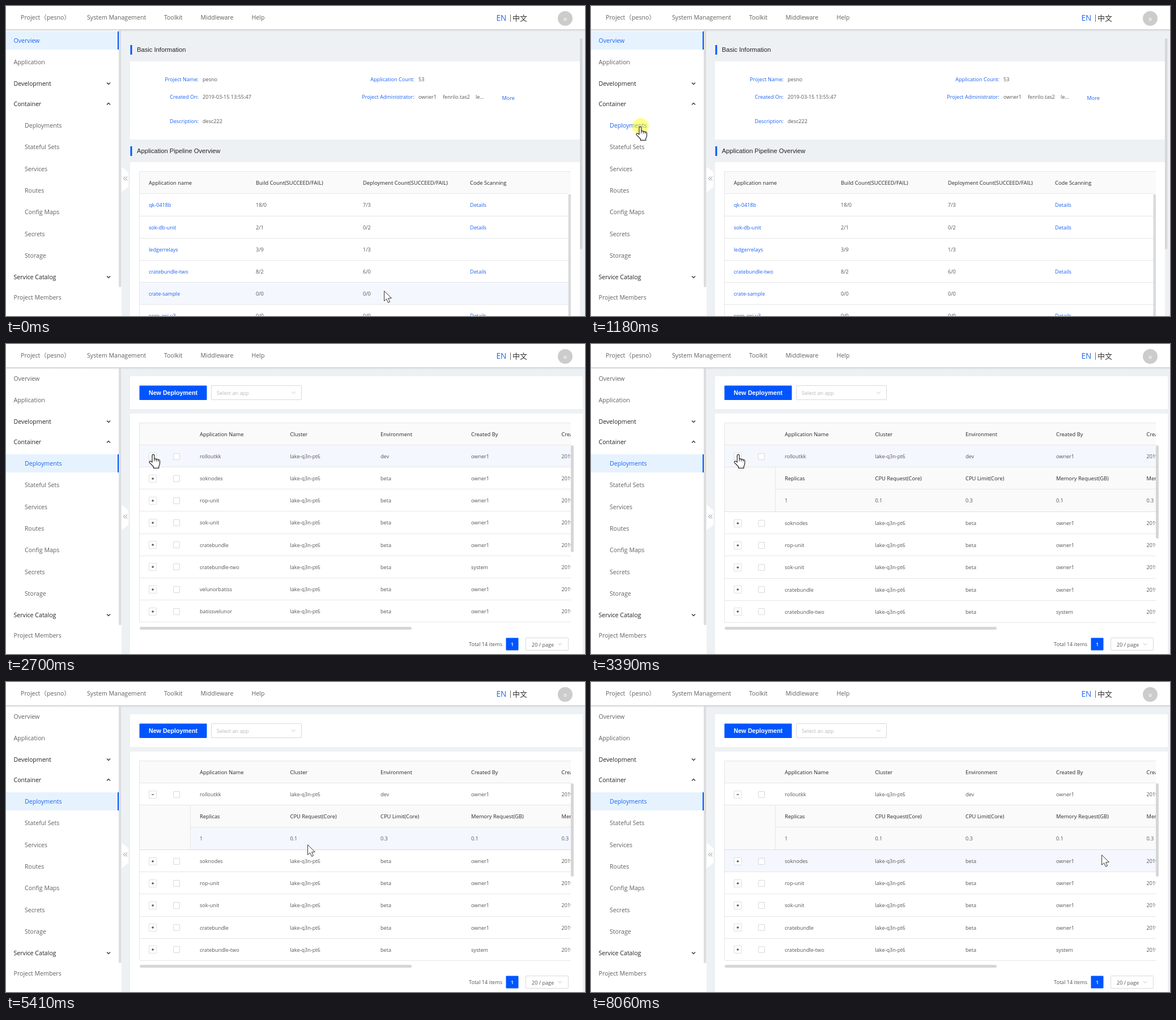
Write an HTML page that moves like this. It is 1022 px wide and 548 px high and loops after 8210 ms.

```html
<!DOCTYPE html>
<html lang="en">
<head>
<meta charset="utf-8">
<title>Deployments walkthrough</title>
<style>
html, body { margin: 0; width: 100%; height: 100%; overflow: hidden; background: #eef1f4; }
svg { display: block; }
text { font-family: "Open Sans", "Noto Sans", "Noto Sans CJK SC", "Noto Sans CJK", sans-serif; font-size: 9.1px; fill: #555; white-space: pre; }
.nav { font-size: 10.6px; fill: #606060; }
.group { font-size: 10.6px; fill: #222; }
.head { font-size: 9.35px; font-weight: 500; fill: #262626; }
.link { fill: #1a62f2; }
.title { font-family: "Liberation Sans", Arial, sans-serif; font-size: 11.2px; fill: #222; }
.button { font-family: "Liberation Sans", Arial, sans-serif; font-size: 10.7px; font-weight: bold; fill: #fff; }
.hint { fill: #b8b8b8; }
.end { text-anchor: end; }
.mid { text-anchor: middle; }
</style>
</head>
<body>
<svg id="stage" width="1022" height="548" viewBox="0 0 1022 548"></svg>
<script>
const LOOP = 8210;
const BLUE = '#0055ff', LINE = '#e6e6e6', BAR = '#d6d6d6', HOVER = '#f4f7fe';
const ROW = 39.15, DETAIL = 79;

const rect = (x, y, w, h, fill, extra = '') =>
  `<rect x="${x}" y="${y}" width="${w}" height="${h}" fill="${fill}" ${extra}/>`;
const frame = (x, y, w, h, r = 1.5, stroke = '#d9d9d9') =>
  rect(x, y, w, h, '#fff', `rx="${r}" stroke="${stroke}"`);
const text = (x, y, s, cls = '', extra = '') =>
  `<text x="${x}" y="${y}" class="${cls}" ${extra}>${s}</text>`;
const path = (d, stroke, w = 1, fill = 'none') =>
  `<path d="${d}" fill="${fill}" stroke="${stroke}" stroke-width="${w}"/>`;
const chevron = (x, y, dir, size, stroke, w) =>
  path(`M${x - size} ${y - dir * size / 2}l${size} ${dir * size}l${size} ${-dir * size}`, stroke, w);
const group = (id, body, extra = '') => `<g id="${id}" ${extra}>${body}</g>`;
const cells = (xs, y, list, cls = '') =>
  list.map((s, i) => s ? text(xs[i], y + 3.4, s, cls) : '').join('');

function header() {
  return rect(0, 0, 1022, 41, '#fff') + rect(0, 41, 1022, 4, 'url(#shade)') +
    text(26, 24, 'Project', 'nav') + text(61, 24, '（', 'nav') +
    text(72, 24, 'pesno', 'nav') + text(102.5, 24, '）', 'nav') +
    text(143, 24, 'System Management', 'nav') + text(279, 24, 'Toolkit', 'nav') +
    text(343.5, 24, 'Middleware', 'nav') + text(433.5, 24, 'Help', 'nav') +
    text(865.5, 25.5, 'EN', 'link', 'style="font-size:13.6px"') +
    text(887, 25, '|', '', 'style="font-size:12.5px"') +
    text(894, 25.5, '中文', '', 'style="font-size:13px;fill:#333"') +
    '<circle cx="987" cy="22" r="13" fill="#ccc"/>' +
    text(987, 25.5, 'o', 'mid', 'style="fill:#fff;font-weight:600"');
}

function sidebar() {
  const groups = [['Development', 137, 1], ['Container', 173, -1], ['Service Catalog', 479, 1]];
  const subs = ['Stateful Sets', 'Services', 'Routes', 'Config Maps', 'Secrets', 'Storage'];
  const selected = y => rect(0, y, 198, 32, '#e6f3ff') + rect(197, y, 2, 32, BLUE);
  return rect(0, 41, 204, 507, '#fff') + rect(199, 42, 4.5, 455, '#dcdddf', 'rx="2"') +
    group('pickOverview', selected(45)) + group('pickDeploy', selected(195)) +
    text(13.5, 65, 'Overview', 'nav', 'id="overviewItem"') +
    text(13.5, 103, 'Application', 'nav') + text(13.5, 518.7, 'Project Members', 'nav') +
    groups.map(([s, y, dir]) => text(13.5, y + 4.2, s, 'group') + chevron(181, y, dir, 3, '#333', 1.3)).join('') +
    text(33, 215, 'Deployments', 'nav', 'id="deployItem"') +
    subs.map((s, i) => text(33, 253.3 + i * 38.35, s, 'nav')).join('') +
    path('M204 284L216 294V320L204 329Z', 'none', 0, '#fff') +
    path('M210.5 301.5l-3 3.5l3 3.5M214 301.5l-3 3.5l3 3.5', '#8c8c8c');
}

function overview() {
  const xs = [252, 441, 630, 819], top = 331.9;
  const rows = [
    ['qk-0418b', '18/0', '7/3', 'Details'], ['sok-db-unit', '2/1', '0/2', 'Details'],
    ['ledgerrelays', '3/9', '1/3', ''], ['cratebundle-two', '8/2', '6/0', 'Details'],
    ['crate-sample', '0/0', '0/0', ''], ['sorn-api-v3', '0/0', '0/0', 'Details']
  ];
  const info = [
    [340, 130, 'Project Name:', 'pesno'], [340, 161, 'Created On:', '2019-03-15 13:55:47'],
    [340, 204, 'Description:', 'desc222'], [721, 130, 'Application Count:', '53'],
    [721, 161, 'Project Administrator:', 'owner1']
  ];
  const title = (y, s) => rect(219.5, y - 8, 3, 17, BLUE) + text(231, y + 4, s, 'title');
  return title(77, 'Basic Information') + title(256, 'Application Pipeline Overview') +
    rect(219, 98, 794, 138, '#fff') + rect(219, 276, 794, 272, '#fff') +
    rect(1013, 57, 4.5, 373, '#d6d7d9', 'rx="2"') +
    info.map(([x, y, k, v]) => text(x, y + 3.4, k, 'link end') + text(x + 7, y + 3.4, v)).join('') +
    text(771, 164.4, 'fenrilo.tas2') + text(829, 164.4, 'le...') + text(875.5, 166, 'More', 'link') +
    rect(236, 292.5, 761, 39, '#fafafa') + group('hoverOverview', rect(236, 0, 756.5, ROW, HOVER)) +
    cells(xs, 313, ['Application name', 'Build Count(SUCCEED/FAIL)', 'Deployment Count(SUCCEED/FAIL)', 'Code Scanning'], 'head') +
    path('M997 292.5H235.5V548', LINE) +
    rows.map((r, i) => {
      const y = top + i * ROW;
      return path(`M236 ${Math.floor(y) + .5}H992.5`, LINE) +
        r.map((s, k) => text(xs[k], y + 23.5, s, k % 3 ? '' : 'link')).join('');
    }).join('') +
    rect(992.5, 332.5, 4.5, 220, '#d9dadc', 'rx="2"');
}

const COLS = [342, 501.5, 661, 821, 980.5];

function deployRow(name, i) {
  const y = 179 + i * ROW, mid = Math.round(y + 19.6);
  return path(`M236 ${Math.round(y + ROW) - .5}H998`, LINE) +
    frame(252.5, mid - 6.5, 13, 13, .5, '#e0e0e0') +
    path(`M257 ${mid}H261.2`, '#444', 1.2) +
    group('stem' + i, path(`M259.1 ${mid - 2.1}v4.2`, '#444', 1.2)) +
    frame(295.5, mid - 5.5, 11, 11) +
    cells(COLS, y + 19.6, [name, 'lake-q3n-pt6', i ? 'beta' : 'dev', name === 'cratebundle-two' ? 'system' : 'owner1', '2019-07-25']);
}

function nested() {
  return rect(236, 218, 762, 78.5, '#fafafa') +
    group('hoverNested', rect(326, 257, 672, 39, HOVER)) +
    path('M326 256.5H998M325.5 218V296', LINE) + path('M236 296.5H998', '#dedede') +
    cells(COLS, 238, ['Replicas', 'CPU Request(Core)', 'CPU Limit(Core)', 'Memory Request(GB)', 'Memory Limit(GB)'], 'head') +
    cells(COLS, 277, ['1', '0.1', '0.3', '0.1', '0.3']);
}

function deployments() {
  const names = ['rolloutkk', 'soknodes', 'rop-unit', 'sok-unit', 'cratebundle', 'cratebundle-two', 'velunorbatiss', 'batissvelunor'];
  const rows = names.map(deployRow);
  return rect(219, 57, 799, 58, '#fff') + rect(219, 123, 799, 425, '#fff') +
    rect(235.5, 73.5, 119, 25.5, BLUE, 'rx="1"') + text(295, 90, 'New Deployment', 'button mid') +
    frame(362.5, 73.5, 159, 25) + text(372, 90, 'Select an app', 'hint') + chevron(507.5, 86, 1, 3.5, '#c4c4c4', 1) +
    `<g clip-path="url(#tableClip)">` +
    rect(236, 139.5, 762, 39, '#fafafa') +
    group('hoverRow', rect(236, 0, 762, ROW, HOVER)) +
    path('M998 139.5H235.5V492M236 178.5H998', LINE) +
    cells(COLS, 159.5, ['Application Name', 'Cluster', 'Environment', 'Created By', 'Created On'], 'head') +
    rows[0] + group('detail', nested()) + group('restRows', rows.slice(1).join('')) + '</g>' +
    rect(997, 179, 5, 189, BAR, 'id="scroll" rx="2.5"') + rect(236, 500, 480, 5, BAR, 'rx="2.5"') +
    text(817, 534, 'Total 14 items') + rect(882.5, 519.5, 22, 22, BLUE, 'rx="1"') +
    text(893.5, 534.2, '1', 'mid', 'style="fill:#fff;font-weight:600"') +
    frame(917.5, 519.5, 75, 22) + text(928, 535, '20 / page') + chevron(978, 530.5, 1, 3.3, '#c4c4c4', 1);
}

const arrow = path('M.6 .8V18.4L4.6 14.8L7.6 21.4L10.5 20L7.7 13.8L13.3 13.4Z', '#333', 1, '#fff');
const hand = path('M-2 14V2.3a1.9 1.9 0 0 1 3.8 0V8.8c.5-1.4 3.3-1.2 3.5.5 .6-1.2 3.1-1 3.3.8 .8-.9 2.9-.4 2.9 1.3V16c0 3-1.8 4.4-1.8 6V24.4H.4V22L-6.6 14.8c-1.3-1.9 .9-3.6 2.5-2.2Z', '#222', 1.2, '#fff') +
  path('M1.8 8.8V12.4M5.3 9.4V12.6M8.6 10.2V12.8', '#222');

document.getElementById('stage').innerHTML =
  '<defs><clipPath id="tableClip"><rect x="235" y="139" width="762" height="354"/></clipPath>' +
  '<linearGradient id="shade" x2="0" y2="1"><stop stop-color="#ccd0d4"/>' +
  '<stop offset="1" stop-color="#ccd0d4" stop-opacity="0"/></linearGradient></defs>' +
  rect(0, 0, 1022, 548, '#eef1f4') + group('overviewPage', overview()) + group('deployPage', deployments()) +
  sidebar() + header() +
  '<circle id="ring" r="14.5" fill="#ff0" fill-opacity=".47"/>' +
  group('arrow', arrow) + group('hand', hand);

const el = {};
document.querySelectorAll('[id]').forEach(e => el[e.id] = e);

// Pointer moves: start, time of last step, step count, evenly spaced waypoints
const moves = [
  [190, 950, 11, [[667, 503], [600, 470], [400, 370], [180, 262], [87, 213], [87, 213]]],
  [1960, 2700, 10, [[87, 213], [105, 225], [150, 243], [205, 236], [250, 208], [260, 195]]],
  [3690, 4490, 11, [[260, 195], [272, 225], [296, 256], [322, 279], [336, 282], [358, 282]]],
  [4560, 5340, 11, [[358, 282], [390, 283], [450, 284], [500, 285], [535, 285], [538, 285]]],
  [5410, 6190, 11, [[538, 285], [525, 290], [580, 298], [680, 297], [750, 290], [768, 285]]],
  [6280, 6690, 6, [[768, 285], [820, 278], [869, 280], [890, 280]]],
  [6840, 7600, 11, [[890, 280], [920, 276], [943, 275], [935, 284], [912, 300], [901, 305]]]
];

function pointer(t) {
  const move = moves.filter(m => t >= m[0]).pop();
  if (!move) return moves[0][3][0];
  const [from, to, steps, pts] = move;
  const step = Math.floor((t - from + 25) / ((to - from) / (steps - 1)));
  const u = Math.min(1, (step + 1) / steps) * (pts.length - 1);
  const i = Math.min(Math.floor(u), pts.length - 2);
  return [0, 1].map(k => Math.round(pts[i][k] + (pts[i + 1][k] - pts[i][k]) * (u - i)));
}

const show = (e, on) => e.setAttribute('visibility', on ? 'visible' : 'hidden');
const place = (e, x, y) => e.setAttribute('transform', `translate(${x} ${y})`);
const mix = (a, b, u) => `rgb(${a.map((v, i) => Math.round(v + (b[i] - v) * u))})`;
const GREY = [96, 96, 96], ACTIVE = [26, 98, 242];

function hoverRows(x, y, onDeploy, open) {
  const inTable = x > 236 && x < 997;
  const row = Math.floor((y - 332) / ROW);
  show(el.hoverOverview, !onDeploy && inTable && row >= 0);
  place(el.hoverOverview, 0, 332 + row * ROW);

  const onNested = open && y >= 218 && y < 297;
  const shift = open && y >= 297 ? DETAIL : 0;
  const line = Math.floor((y - shift - 178.5) / ROW);
  show(el.hoverRow, onDeploy && inTable && !onNested && line >= 0);
  place(el.hoverRow, 0, 179 + line * ROW + shift);
  show(el.hoverNested, onNested && y >= 257 && x > 326);
}

function draw(t) {
  const [x, y] = pointer(t);
  const picked = t >= 1200, onDeploy = t >= 1280, open = t >= 3390;

  el.overviewPage.style.display = onDeploy ? 'none' : '';
  el.deployPage.style.display = onDeploy ? '' : 'none';
  show(el.pickOverview, !picked);
  show(el.pickDeploy, picked);
  el.overviewItem.style.fill = mix(GREY, ACTIVE, picked ? 0 : 1);
  el.deployItem.style.fill = mix(GREY, ACTIVE, Math.max(0, Math.min(1, (t - 650) / 300)));

  el.detail.style.display = open ? '' : 'none';
  place(el.restRows, 0, open ? DETAIL : 0);
  show(el.stem0, !open);
  el.scroll.setAttribute('height', open ? 165 : 189);
  hoverRows(x, y, onDeploy, open);

  const onToggle = onDeploy && Math.abs(x - 259) < 8 && Math.abs(y - 198.5) < 8;
  const pointing = (x < 198 && y > 45) || onToggle;
  show(el.hand, pointing);
  show(el.arrow, !pointing);
  place(el.hand, x, y);
  place(el.arrow, x, y);
  show(el.ring, (t >= 1050 && t < 1200) || (t >= 3070 && t < 3220));
  place(el.ring, x + .5, y - .5);
}

const start = performance.now();
function tick() {
  draw((performance.now() - start) % LOOP);
  requestAnimationFrame(tick);
}
tick();
</script>
</body>
</html>
```
